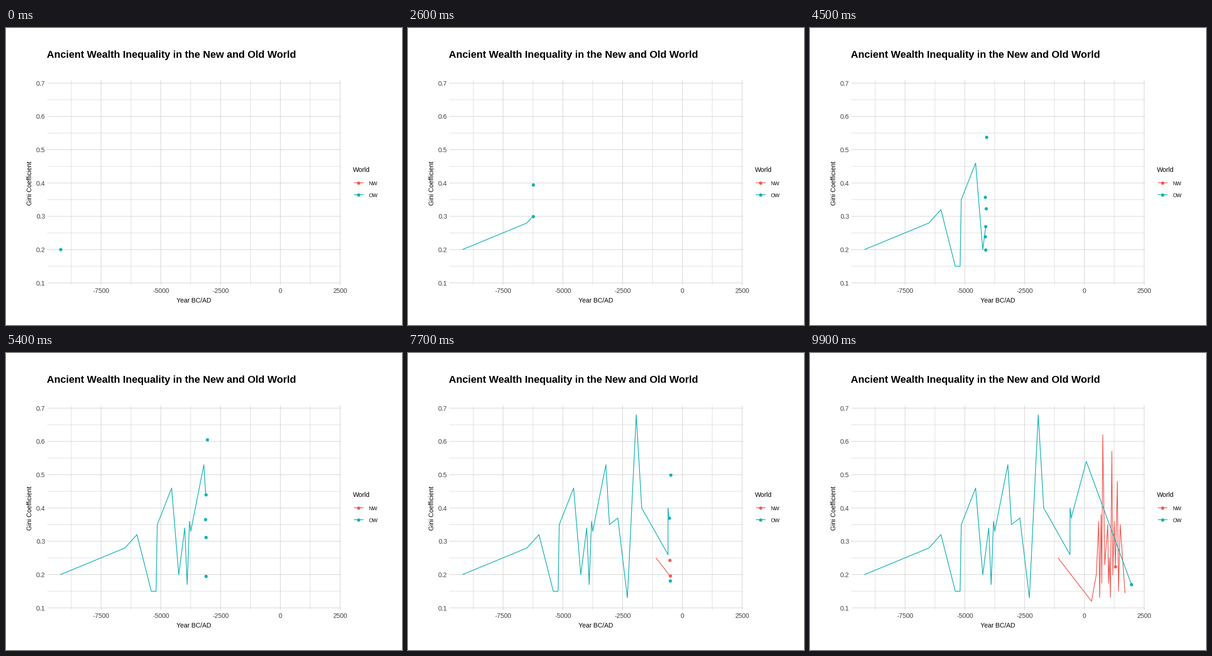
These frames come from a looping animation (864x648 px, 10000 ms). A matplotlib script:

```python
import numpy as np
import matplotlib.pyplot as plt
from matplotlib.animation import FuncAnimation

W, H, DPI = 864, 648, 108
FRAMES, INTERVAL = 100, 100
FIRST, LAST = -9200, 1970
RED, TEAL = "#F15D57", "#14B2B7"
PX = 72 / DPI        # points per pixel
NARROW = 0.823       # overall type scale, keeps the labels compact
LONG_GAP = 1500      # no dot walks the line over gaps longer than this

# Turning points of the Old World line: (year, gini)
OLD = [(-9200, .20), (-6500, .28), (-6000, .32), (-5400, .15), (-5200, .15),
       (-5150, .35), (-4550, .46), (-4250, .20), (-4000, .34), (-3900, .17),
       (-3800, .36), (-3750, .33), (-3200, .53), (-3050, .35), (-2700, .37),
       (-2300, .13), (-1930, .68), (-1700, .40), (-600, .26), (-600, .40),
       (-550, .37), (80, .54), (1970, .17)]
OLD_LEAPS = [(0, 16), (3, 21), (4, 8), (5, 14), (7, 22)]

PEAKS = [(600, .36), (700, .38), (770, .62), (980, .35), (1050, .25),
         (1150, .57), (1250, .36), (1380, .48), (1500, .35)]


def zigzag(peaks, end):
    """Peaks with a gently waving row of troughs between them."""
    rows = []
    stops = [x for x, _ in peaks[1:]] + [end]
    for k, ((x, y), stop) in enumerate(zip(peaks, stops)):
        low = stop if stop == end else x + 0.4 * (stop - x)
        rows += [(x, y), (low, 0.18 + 0.05 * np.cos(1.7 * (k - 2)))]
    return rows


NEW = [(-1100, .25), (300, .12), (500, .20)] + zigzag(PEAKS, 1700)
NEW_LEAPS = [(0, 16)] + [(i, i + 9) for i in range(3, 12, 2)]


def px(year):
    return 598.6 + 0.05215 * year


def py(gini):
    return 556.1 - 726.3 * (gini - 0.1)


def step(row):
    """Animation step at which a row is reached."""
    return round((row[0] - FIRST) / (LAST - FIRST) * (FRAMES - 1))


def between(a, b, i):
    k = (i - step(a)) / (step(b) - step(a))
    return a[0] + (b[0] - a[0]) * k, a[1] + (b[1] - a[1]) * k


def trail(rows, i):
    """Part of the line that is revealed at step i."""
    done = [r for r in rows if step(r) <= i]
    ahead = rows[len(done):]
    if done and ahead and step(done[-1]) < i:
        done.append(between(done[-1], ahead[0], i))
    return done


def hops(rows, leaps):
    """Pairs of rows joined by a moving dot: close neighbours and leaps."""
    near = [(a, b) for a, b in zip(rows, rows[1:]) if b[0] - a[0] < LONG_GAP]
    return near + [(rows[a], rows[b]) for a, b in leaps]


def travellers(pairs, rest, i):
    """Dots under way at step i, and the one that stays to the end."""
    dots = [between(a, b, i) for a, b in pairs if step(a) <= i < step(b)]
    return dots + [rest] * (i >= step(rest))


def place(artist, rows):
    artist.set_data([px(x) for x, _ in rows], [py(y) for _, y in rows])


plt.rcParams["font.family"] = "Liberation Sans"
fig = plt.figure(figsize=(W / DPI, H / DPI), dpi=DPI, facecolor="white")
ax = fig.add_axes([0, 0, 1, 1])
ax.set_xlim(0, W)
ax.set_ylim(H, 0)
ax.axis("off")


def label(x, y, s, size, **kw):
    kw = {"va": "baseline", "color": "black", **kw}
    ax.text(x, y, s, fontsize=size * NARROW, **kw)


def rule(xs, ys, major):
    ax.plot(xs, ys, color="#CCCCCC" if major else "#DADADA", lw=PX,
            solid_capstyle="butt", zorder=1, snap=False)


def stroke(color, xs=(), ys=(), z=2):
    return ax.plot(xs, ys, color=color, lw=1.6 * PX, zorder=z, snap=False,
                   solid_capstyle="butt", solid_joinstyle="round")[0]


def dot(color, xs=(), ys=(), z=4):
    return ax.plot(xs, ys, "o", color=color, ms=7.2 * PX, mew=0, zorder=z,
                   snap=False)[0]


for n in range(13):
    g = 0.1 + 0.05 * n
    rule([90, 731], [py(g)] * 2, n % 2 == 0)
    if n % 2 == 0:
        label(85.5, py(g) + 5.5, f"{g:.1f}", 11.5, ha="right", color="#404040")

for n in range(10):
    year = -8750 + 1250 * n
    rule([px(year)] * 2, [114, 561], n % 2 == 1)
    if n % 2 == 1:
        label(px(year), 578.5, str(year), 11.5, ha="center", color="#404040")

label(89, 64.5, "Ancient Wealth Inequality in the New and Old World", 18,
      weight="bold")
label(410, 599, "Year BC/AD", 11.5, ha="center")
label(59, 338.5, "Gini Coefficient", 11.5, ha="right", va="center",
      rotation=90)

label(756.5, 314.5, "World", 11.5)
for y, name, color in ((337.6, "NW", RED), (363.6, "OW", TEAL)):
    stroke(color, [759, 780], [y, y])
    dot(color, [769.4], [y])
    label(791, y + 5, name, 9.2)

series = []
for z, (rows, leaps, rest, color) in enumerate((
        (NEW, NEW_LEAPS, NEW[16], RED), (OLD, OLD_LEAPS, OLD[-1], TEAL))):
    series.append((rows, hops(rows, leaps), rest,
                   stroke(color, z=2 + z), dot(color, z=4 + z)))


def draw(i):
    for rows, pairs, rest, line, dots in series:
        place(line, trail(rows, i))
        place(dots, travellers(pairs, rest, i))
    return [a for s in series for a in s[3:]]


anim = FuncAnimation(fig, draw, frames=FRAMES, interval=INTERVAL,
                     repeat=True, repeat_delay=0, blit=False)
plt.show()
```
